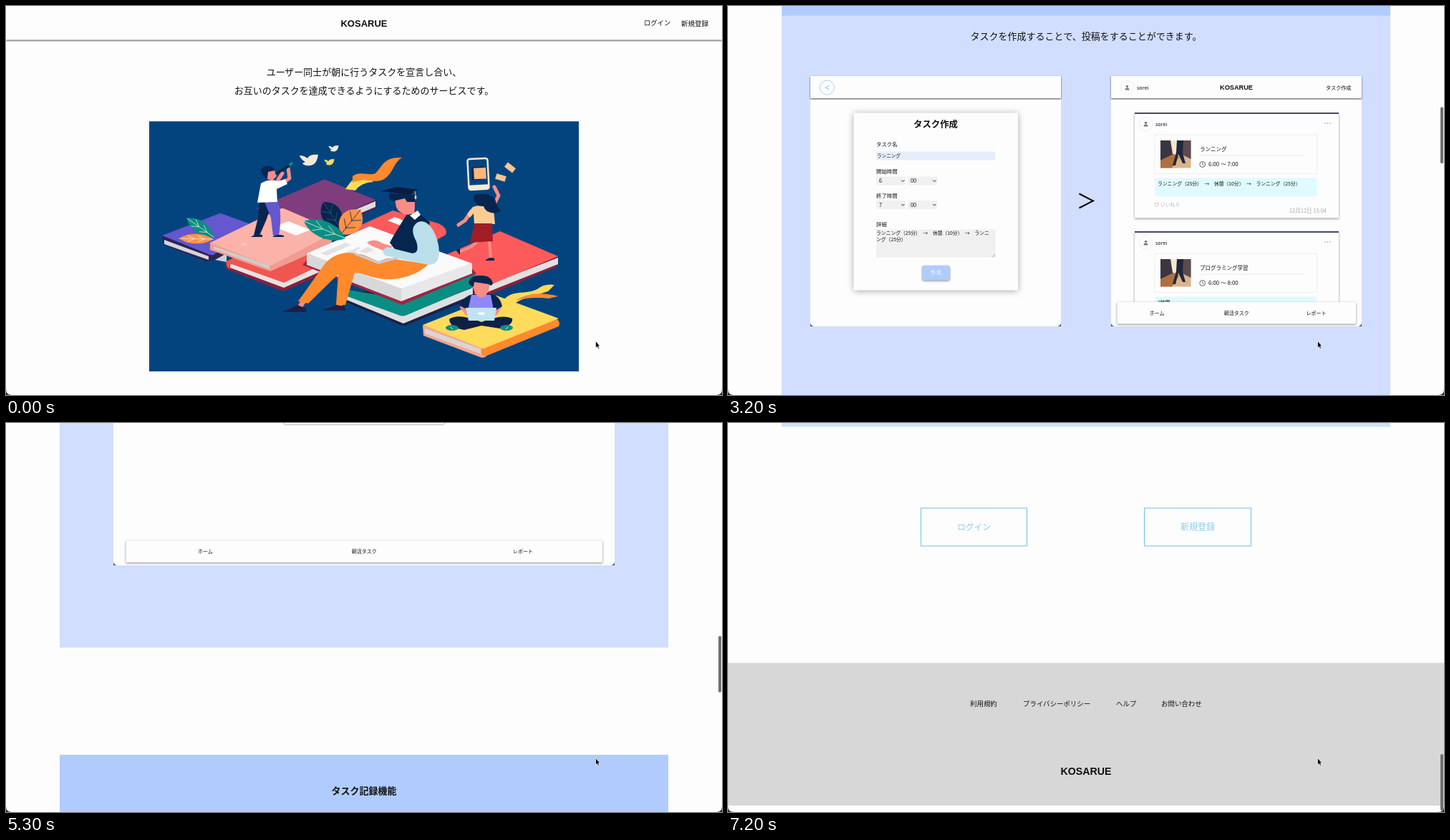
An HTML page for the animation above (7300 ms loop, 1000 by 544 pixels).

```html
<!DOCTYPE html>
<html lang="ja">
<head>
<meta charset="utf-8">
<title>Landing page scroll</title>
<style>
html, body { margin: 0; width: 100%; height: 100%; overflow: hidden; background: #fdfdfd; }
svg { display: block; width: 1000px; height: 544px; }
text { font-family: "Noto Sans CJK JP", "Noto Sans CJK", "Noto Sans", sans-serif; }
.brand { font-family: "Liberation Sans", Arial, sans-serif; }
.bar { filter: drop-shadow(0 1.5px 1px #000b); }
.card { filter: drop-shadow(0 1px 1.5px #0007); }
.soft { filter: drop-shadow(0 1px 5px #0005); }
.ln { fill: none; stroke-linecap: round; stroke-linejoin: round; }
</style>
</head>
<body>
<svg viewBox="0 0 1000 544">
  <defs>
    <clipPath id="feed"><rect x="535" y="98" width="350" height="335"/></clipPath>
    <path id="bird" d="M-14-6Q-8-6-3-2Q0-8 12-7Q10 7 1 8Q-7 9-10 5L-6 3Q-12 0-14-6Z"/>
  </defs>
  <g id="page"></g>
  <rect id="thumb" x="995" width="4" height="79" rx="2" fill="#707070"/>
  <path fill="#252b3a" d="M0 536Q0 544 8 544H0ZM1000 536Q1000 544 992 544H1000Z"/>
  <path fill="#000" stroke="#fff" stroke-width=".7" d="M823.5 468.5V478l2-1.7 1.4 3 1.6-.8-1.3-2.8h2.5Z"/>
</svg>
<script>
const BRAND = 'KOSARUE', USER = 'sorei';
const LOOP = 7300, STEP = 100;
const NAVY = '#06254f', SKIN = '#f98c87', PAGE = '#fdfdfd', SEA = '#03447f', CREAM = '#f6ead6';

// Basic pieces
const rect = (x, y, w, h, fill, more = '') =>
  `<rect x="${x}" y="${y}" width="${w}" height="${h}" fill="${fill}" ${more}/>`;
const shape = (fill, d) => `<path fill="${fill}" d="${d}"/>`;
const line = (color, width, d) => `<path class="ln" stroke="${color}" stroke-width="${width}" d="${d}"/>`;
const at = (y, body) => `<g transform="translate(0 ${y})">${body}</g>`;
const label = (x, mid, str, size, { anchor = 'start', weight = 400, fill = '#111', cls = '' } = {}) =>
  `<text x="${x}" y="${mid + size * 0.37}" font-size="${size}" text-anchor="${anchor}" font-weight="${weight}" fill="${fill}" class="${cls}">${str}</text>`;
const center = (x, mid, str, size, more = {}) => label(x, mid, str, size, { anchor: 'middle', ...more });
const brand = (x, mid, size) => center(x, mid, BRAND, size, { weight: 700, cls: 'brand' });

function leaf(fill, x1, y1, x2, y2, bulge, vein = CREAM) {
  const dx = x2 - x1, dy = y2 - y1, len = Math.hypot(dx, dy);
  const nx = -dy / len * bulge, ny = dx / len * bulge;
  const point = (t, k) => `${x1 + dx * t + nx * k} ${y1 + dy * t + ny * k}`;
  let veins = `M${x1} ${y1}L${x2} ${y2}`;
  for (const t of [.45, .75])
    for (const k of [.6, -.6]) veins += `M${point(t, 0)}L${point(t - .2, k)}`;
  return shape(fill, `M${x1} ${y1}C${point(.25, 1.3)} ${point(.75, 1.3)} ${x2} ${y2}C${point(.75, -1.3)} ${point(.25, -1.3)} ${x1} ${y1}`) +
    line(vein, .8, veins);
}

function books() {
  return [
    // plum
    shape('#4d2053', 'M350 288L443 246L517 273V283L430 322Z'),
    shape('#ddd', 'M516 273V281L478 297V289Z'),
    shape('#7f3d7d', 'M350 283L441 244Q445 242 449 244L516 271L425 313Z'),
    // ribbon
    shape('#fedb5b', 'M474 256C483 243 490 235 502 236L513 246C501 247 493 251 488 258Z'),
    shape('#ff8a2e', 'M484 238C494 230 506 238 516 234C526 225 526 211 553 212C541 219 541 234 528 242C514 250 502 238 484 247Z'),
    // violet
    shape('#2d2257', 'M218 321L220 334L281 358L312 348L345 310Z'),
    shape('#d5d5d8', 'M221 327L283 350V355L221 333Z'),
    shape('#6457cf', 'M218 321L296 291Q299 289 303 291L347 307L290 348Q285 349 280 346Z'),
    leaf('#0a8e84', 253, 297, 290, 323, 9),
    leaf('#ff9248', 242, 325, 289, 326, 7),
    shape('#cfd0d6', 'M292 355L308 346V358Z'),
    // lower red
    shape('#8c1f38', 'M307 358L308 368L387 399L440 376V356Z'),
    shape('#e4e2e2', 'M313 360L387 386L440 362V371L388 394L313 366Z'),
    shape('#f0564f', 'M308 357L330 346L445 350V360L388 387L316 361Q310 361 313 368Q306 365 308 357Z'),
    // pink
    shape('#f09d91', 'M285 331V341L369 371L455 333V325Z'),
    shape('#d0cccb', 'M290 336L368 363V368L290 340Z'),
    shape('#fbb2a9', 'M285 331L382 284Q386 282 390 284L462 315L376 360Q370 364 365 362Z'),
    shape('#fff', 'M375 309L394 301L425 313L405 321Z'),
    line('#fdd8cf', 1, 'M329 333l4-1.5 3 2-4 1.5z'),
    // red behind the reader
    shape('#fc5a5c', 'M475 316L540 286L604 304Q618 311 614 320L580 340L540 338Z'),
    shape('#fff', 'M533 300L543 295L560 302L551 307Z'),
    // right red
    shape('#8c1f38', 'M615 352L771 352V364L655 412Z'),
    shape('#e2e0e2', 'M771 352V361L655 407V397Z'),
    shape('#fd5b5b', 'M605 352L690 315L771 350L655 399Z'),
    // teal
    shape('#1b2144', 'M470 400L475 414L550 446Q555 448 560 446L653 408V395Z'),
    shape('#dedfe3', 'M474 403L554 432L652 394V404L555 444L476 411Z'),
    shape('#0a8e84', 'M465 395L552 409L655 374V392L560 432Q554 435 548 432L468 403Z'),
    // white
    shape('#9c2644', 'M414 362L421 355L552 408L652 368L657 374L553 418Z'),
    shape('#d8d8da', 'M420 346L552 394V413L420 362Z'),
    shape('#e8e8ea', 'M552 394L651 360V374L552 413Z'),
    shape('#fafafa', 'M420 346L508 308L651 360L552 395Z'),
    shape('#e2e2e5', 'M439 346L474 331L482 334L449 349ZM458 352L492 337L501 340L468 355Z'),
    leaf(NAVY, 443, 274, 466, 309, 14, '#3c5878'),
    leaf('#ff9248', 495, 285, 468, 319, 16, NAVY),
    leaf('#0a8e84', 416, 301, 474, 325, 12),
  ].join('');
}

function watcher() {
  return [
    shape(NAVY, 'M354 274H371L364 298L354 321H346L352 296Z'),
    shape('#6457cf', 'M361 274L380 273Q386 291 381 321H373L370 296Z'),
    shape(NAVY, 'M342 323Q348 318 358 320V323ZM372 323Q378 318 388 321V323Z'),
    line(SKIN, 5, 'M389 246L396 241L394 226M380 243L386 234'),
    shape('#fff', 'M356 248Q368 241 380 245L390 242L393 249L378 256L379 274L351 275Z'),
    shape(NAVY, 'M357 234Q354 226 363 224Q372 222 375 229L368 240L363 241Z'),
    shape(SKIN, 'M366 232L375 230L378 238L372 244L365 242Z'),
    line(NAVY, 3.5, 'M378 234L395 224'), line('#0a8e84', 3.5, 'M397 222L399 220'),
    ...[[CREAM, 424, 215, 1], [CREAM, 458, 199, .55], ['#fedb5b', 452, 218, .55]].map(
      ([c, x, y, k]) => `<use href="#bird" fill="${c}" transform="translate(${x} ${y}) scale(${k})"/>`),
  ].join('');
}

function painter() {
  const sheet = (x, y, turn) => `<g transform="translate(${x} ${y}) rotate(${turn})">${rect(-7, -4, 14, 8, '#ffc58d')}</g>`;
  const tablet = rect(645.5, 213.5, 28, 43, SEA, `rx="3" stroke="${CREAM}" stroke-width="2.5"`) +
    rect(646, 250, 27, 6, CREAM) + rect(650.5, 225, 17, 18, NAVY) + rect(653.5, 226.5, 17, 15.5, '#ffb777');
  return [
    `<g transform="rotate(-3 659 235)">${tablet}</g>`,
    sheet(691, 240, 17), sheet(704, 226, 38),
    line(SKIN, 5, 'M650 287L641 300L632 306M683 275L688 265L682 253'),
    line(SKIN, 4, 'M658 330L649 337L635 343M675 329L677 352'),
    shape('#fccd92', 'M644 291L652 281Q666 276 681 284L683 305H654L653 290L648 296Z'),
    shape('#a11d26', 'M654 304H679L680 329L648 331Z'),
    shape(NAVY, 'M653 270Q652 261 663 263Q676 262 683 270Q686 282 691 286Q684 293 672 287Q668 284 667 280Q656 281 653 270ZM669 356Q676 350 682 353V356ZM628 341L634 339V348Z'),
  ].join('');
}

function reader() {
  return [
    line(SKIN, 7, 'M416 412L411 420M467 413L466 420'),
    shape('#ff8a2e', 'M590 361C578 374 552 384 528 382C508 380 498 373 487 373L474 418H461L464 375L422 416L408 413L440 368Q454 345 480 345L530 352Z'),
    shape('#201f45', 'M385 428Q397 423 407 418L419 423V428ZM440 425Q454 422 461 418L473 420L474 426Z'),
    shape(NAVY, 'M560 291L575 289L592 302L583 345L548 347L536 331Q541 321 560 291Z'),
    shape('#c9c9ce', 'M487 345L520 357L553 349V352L520 361L487 348Z'),
    shape('#f7f7f8', 'M487 343L513 329L554 346L520 357Z'),
    shape('#e2e2e5', 'M493 343L505 337L514 341L502 346Z'),
    shape(SKIN, 'M504 331Q514 324 526 332L540 336L532 344L512 336Z'),
    shape('#badfeb', 'M574 303C590 294 605 322 605 345C604 361 596 363 585 361L530 349Q522 343 532 337L568 346Q578 345 573 329C567 318 566 309 574 303Z'),
    shape('#fff', 'M564 293L575 286L579 292L571 299Z'),
    shape(SKIN, 'M543 270L570 268Q572 279 570 290L561 292Q548 290 545 281Z'),
    shape(NAVY, 'M535 262L571 264V274L560 274L557 269L540 273Q534 271 535 262Z'),
    shape('#091c40', 'M523 259L546 253L576 257L563 264Z'),
    line('#e5b53e', 1.2, 'M571 259L572 264'), line('#fedb5b', 2.5, 'M572 266V269'),
  ].join('');
}

function coder() {
  return [
    shape('#f7a58f', 'M582 446L583 461L662 491Q667 493 671 490V478Z'),
    shape('#dad5d5', 'M585 451L664 480V487L585 458Z'),
    shape('#ff8a2e', 'M664 479L768 437Q775 441 772 448L669 490Q661 487 664 479Z'),
    shape('#fedb5b', 'M582 446L685 405L772 437L667 479Q662 479 658 476Z'),
    shape('#fedb5b', 'M688 421C704 392 722 406 742 396Q752 388 766 390L757 399C740 405 724 407 712 415L700 423Z'),
    shape('#ff8a2e', 'M711 412Q735 396 771 406L758 409Q735 406 711 412Z'),
    line(SKIN, 6, 'M637 421L644 430M689 421L683 430'),
    shape(NAVY, 'M652 403H677Q690 405 693 420L683 426L646 425L633 419Q640 405 652 403Z'),
    shape('#8f88fb', 'M650 404H677L681 425H645Z'),
    shape(SKIN, 'M652 386H676L674 398L670 405Q664 410 658 405Q652 398 652 386Z'),
    shape(NAVY, 'M646 386Q649 376 663 377Q677 376 680 388Q678 393 674 389L654 386L653 392Q648 393 646 386Z'),
    shape('#102044', 'M619 438Q632 429 664 442Q694 430 707 437Q709 446 690 451L664 447L640 453Q620 450 619 438Z'),
    '<ellipse cx="623" cy="450" rx="9" ry="4" fill="#0a8e84"/><ellipse cx="699" cy="450" rx="9" ry="4" fill="#0a8e84"/>',
    line(CREAM, 1, 'M621 449l3 3M698 452l3-3'),
    shape('#c0e4f0', 'M642 422H685L682 440H646Z'),
    '<ellipse cx="664" cy="430" rx="5" ry="1.8" fill="#fff"/>',
  ].join('');
}

function hero() {
  const top = rect(0, 0, 1000, 47.5, PAGE, 'class="bar"') + brand(500, 24, 13) +
    label(891, 24, 'ログイン', 9.3, { weight: 500 }) + label(943, 24, '新規登録', 9.5, { weight: 500 });
  return top + center(500, 92.5, 'ユーザー同士が朝に行うタスクを宣言し合い、', 13) +
    center(500, 118.5, 'お互いのタスクを達成できるようにするためのサービスです。', 13) +
    rect(200, 161.3, 600, 349.7, SEA) + books() + watcher() + painter() + reader() + coder();
}

// Page sections
const section = (y, title, note) => rect(75, y, 850, 650, '#d2deff') + rect(75, y, 850, 100, '#b0ccff') +
  center(500, y + 50, title, 13, { weight: 700 }) + center(500, y + 129, note, 13);

const screen = (x, y, w) => rect(x, y + 345, 5, 5, '#3a4050') + rect(x + w - 5, y + 345, 5, 5, '#3a4050') +
  rect(x, y, w, 350, PAGE, 'rx="5"') + rect(x, y, w, 31, PAGE, 'class="bar"');

const nav = (x, y, w) => rect(x, y, w, 30.5, PAGE, 'class="card"') +
  ['ホーム', '朝活タスク', 'レポート'].map((s, i) => center(x + w * (2 * i + 1) / 6, y + 15, s, 7, { weight: 500 })).join('');

const avatar = (x, y) => `<circle cx="${x}" cy="${y}" r="9.5" fill="none" stroke="#eee"/><circle cx="${x}" cy="${y - 1.6}" r="1.7" fill="#777"/>` +
  shape('#777', `M${x - 3} ${y + 3.5}Q${x - 3} ${y + .5} ${x} ${y + .5}Q${x + 3} ${y + .5} ${x + 3} ${y + 3.5}Z`);

const photo = (x, y) => rect(x, y, 42.5, 38.5, '#d9b58a') +
  shape('#3c3542', `M${x} ${y}h15l3 20l-18 8z`) + shape('#f3e7cf', `M${x + 14} ${y}h12l-4 19h-5z`) +
  shape('#5b4a50', `M${x + 29} ${y}h13.5v26l-12-6z`) + shape('#b06f3f', `M${x} ${y + 28}l18-9l8 4l-10 15.5h-16z`) +
  shape('#20283c', `M${x + 23} ${y}h9l-1 18l4 14h-4l-6-13l-4 16h-4l5-18z`);

function post(y, name, time, detail) {
  const gray = '#b5b5b5';
  return at(y, rect(568, 0, 285, 147, PAGE, 'class="card"') + rect(568, -.5, 285, 2, '#454b62') +
    avatar(583.5, 15.5) + label(597, 15.5, USER, 7.2) +
    [834, 837.5, 841].map(x => `<circle cx="${x}" cy="14.5" r=".8" fill="#999"/>`).join('') +
    rect(596, 30.5, 226.5, 54.5, 'none', 'stroke="#eee"') + photo(604, 38.5) +
    label(659, 50.5, name, 7.5, { weight: 500 }) + line('#eaeaea', 1, 'M659 59.5H804') +
    '<circle cx="662.7" cy="72" r="3.9" fill="none" stroke="#555" stroke-width=".9"/>' + line('#555', .8, 'M662.7 69.5V72L664.5 73') +
    label(671, 72, time, 7.8, { weight: 500 }) + rect(596, 91, 226.5, 26, '#e0fbff', 'rx="2"') +
    label(600, 99, detail, 6.8, { weight: 500 }) +
    line(gray, .8, 'M598.5 131l-2.6-2.7q-.6-2.7 1.4-2.6l1.2 1 1.2-1q2-.1 1.4 2.6z') +
    label(604, 128, 'いいね 0', 6.8, { fill: gray }) + label(836, 137, '12月12日 15:04', 7.5, { anchor: 'end', fill: '#aaa' }));
}

function creation() {
  const plan = 'ランニング（25分）　→　休憩（10分）　→　ランニ';
  const bold = { weight: 500 };
  const select = (x, y, s) => rect(x, y, 41, 12, '#f0f0f0', 'rx="2"') + label(x + 4, y + 6, s, 7.4) +
    line('#222', 1, `M${x + 35.5} ${y + 5.3}l1.8 1.8 1.8-1.8`);
  const form = screen(115, 98, 350) + '<circle cx="138.5" cy="114" r="10" fill="none" stroke="#b5d0f5"/>' +
    line('#8db6f0', 1, 'M141 111.5L136 114L141 116.5') + rect(175.5, 149.5, 229.5, 248, PAGE, 'class="soft"') +
    center(290, 165, 'タスク作成', 12.4, { weight: 700 }) +
    label(207, 193.5, 'タスク名', 7.4, bold) + rect(207, 203.5, 166.5, 12, '#e6eefb', 'rx="1"') + label(208, 209.5, 'ランニング', 6.6, bold) +
    label(207, 231.5, '開始時間', 7.4, bold) + select(207, 238.5, '6') + select(251, 238.5, '00') +
    label(207, 265, '終了時間', 7.4, bold) + select(207, 272, '7') + select(251, 272, '00') +
    label(207, 305.5, '詳細', 7.4, bold) + rect(207, 312.5, 166.5, 39, '#f0f0f0') +
    label(207, 317.5, plan, 6.8, bold) + label(207, 326.5, 'ング（25分）', 6.8, bold) +
    line('#888', .6, 'M369.5 350.5l3-3M371.5 350.5l1-1') +
    rect(271.5, 363, 38, 20.5, '#b0ccfd', 'rx="2" class="card"') + center(290.5, 373, '作 成', 6.7, { fill: '#fff' });
  const feed = screen(535, 98, 350) + avatar(557.5, 114) + label(571, 114, USER, 7.2) + brand(710, 114, 9.2) +
    label(835, 114, 'タスク作成', 7.1, bold) +
    `<g clip-path="url(#feed)">${post(149.5, 'ランニング', '6:00 〜 7:00', plan + 'ング（25分）')}${post(315.5, 'プログラミング学習', '6:00 〜 8:00', '2時間')}</g>` +
    nav(543.5, 414, 333.5);
  return form + '<path fill="none" stroke="#000" stroke-width="2" d="M490.5 262.5L510 272.5L490.5 282.5"/>' + feed;
}

const tasks = () => screen(150, -151, 700) + center(500, -134.5, '朝活タスク', 7.5, { weight: 700 }) +
  rect(387.5, -92, 225.5, 94.5, PAGE, 'rx="3" stroke="#bbb"') +
  center(500, -72, 'ランニング', 7.5, { weight: 500 }) + line('#ddd', 1, 'M430 -61H570') +
  center(500, -46, '6:00 〜 7:00', 7.4) + nav(167.5, 164.5, 665.5);

function report() {
  const stroke = 'rx="3" stroke="#bdbdbd"';
  const stats = [['タスク数', 15], ['達成数', 10], ['達成時間計', 8]].map(([name, n], i) => {
    const x = 266 + 163.5 * i;
    return rect(x, 293.5, 141.5, 39, PAGE, stroke) + line('#bdbdbd', 1, `M${x} 309.5h141.5`) +
      center(x + 70.7, 301.5, name, 7.4, { weight: 500 }) + center(x + (i == 2 ? 67.5 : 70.7), 321.5, n, 9.5, { weight: 500 });
  }).join('') + label(665.5, 322, 'h', 5, { fill: '#bbb' });
  const grid = [10, 5, 0].map(n => line(n ? '#eee' : '#ccc', 1, `M267 ${491 - n * 10}H744`) +
    label(263.5, 491 - n * 10, n, 4.7, { anchor: 'end', fill: '#555' })).join('');
  const bars = [0, 2, 1, 3, 0, 1, 1].map((n, i) => {
    const x = 301.3 + 68 * i;
    return (n ? rect(x - 24.5, 491 - n * 10, 49, n * 10, '#8fa8de') +
      `<path fill="none" stroke="#4a72d0" d="M${x - 24.5} 491v${-n * 10}h49v${n * 10}"/>` : '') +
      center(x, 497.5, `12月${6 + i}日`, 4.9, { fill: '#555' });
  }).join('');
  return screen(150, 227, 700) + center(500, 243, '記録', 8.2, { weight: 700 }) + stats +
    rect(246.5, 365.5, 507.5, 145, PAGE, stroke) + center(500, 378, '1週間の達成数', 7.5, { weight: 500 }) +
    line('#aaa', 1, 'M430 384H570') + line('#e5e5e5', 1, 'M267 391V491') + grid + bars + nav(167.5, 542.5, 665.5);
}

function footer() {
  const button = (x, w, s, size) => rect(x, 119, w, 53, 'none', 'stroke="#6cc0e8"') +
    center(x + w / 2, 145.5, s, size, { weight: 500, fill: '#86cdf0' });
  const links = [[338, '利用規約'], [412, 'プライバシーポリシー'], [542, 'ヘルプ'], [605, 'お問い合わせ']];
  return button(269.5, 148, 'ログイン', 11.7) + button(581.5, 149, '新規登録', 12) +
    rect(0, 335.5, 1000, 199.5, '#d7d7d7') +
    links.map(([x, s]) => label(x, 393, s, 9.45, { weight: 500 })).join('') + brand(500, 487, 14.2);
}

const page = document.getElementById('page'), thumb = document.getElementById('thumb');
page.innerHTML = hero() +
  section(854, 'タスク作成機能', 'タスクを作成することで、投稿をすることができます。') + at(940.5, creation()) +
  section(1653.5, 'タスク管理機能', 'その日作成したタスクの一覧を確認することができます。') + at(1989.5, tasks()) +
  section(2453.5, 'タスク記録機能', 'タスク達成数・達成した時間などを確認することができます。') + at(2411, report()) +
  at(3098, footer());

// Scroll position: monotone cubic through [time, offset]
const keys = [[0, 0], [1100, 0], [1600, 161.5], [3200, 940.5], [4000, 1250.5], [5300, 1989.5], [5900, 2411], [7000, 3090], [7200, 3098], [7300, 3098]];
const slopes = keys.slice(1).map(([t, s], i) => (s - keys[i][1]) / (t - keys[i][0]));
const tangent = i => {
  const a = slopes[i - 1] || 0, b = slopes[i] || 0;
  return a * b > 0 ? 2 * a * b / (a + b) : 0;
};
function scrollAt(t) {
  let i = 0;
  while (i < keys.length - 2 && t >= keys[i + 1][0]) i++;
  const [t0, a] = keys[i], [t1, b] = keys[i + 1], d = t1 - t0, u = (t - t0) / d;
  const ease = u * u * (3 - 2 * u);
  return a + (b - a) * ease + d * u * (1 - u) * ((1 - u) * tangent(i) - u * tangent(i + 1));
}

function draw(now) {
  const s = scrollAt(Math.floor(now % LOOP / STEP) * STEP);
  page.setAttribute('transform', `translate(0 ${-s})`);
  thumb.setAttribute('y', 0.9 + s * 0.14916);
  thumb.setAttribute('visibility', s > 0 ? 'visible' : 'hidden');
}
function tick() {
  draw(performance.now());
  requestAnimationFrame(tick);
}
tick();
</script>
</body>
</html>
```
